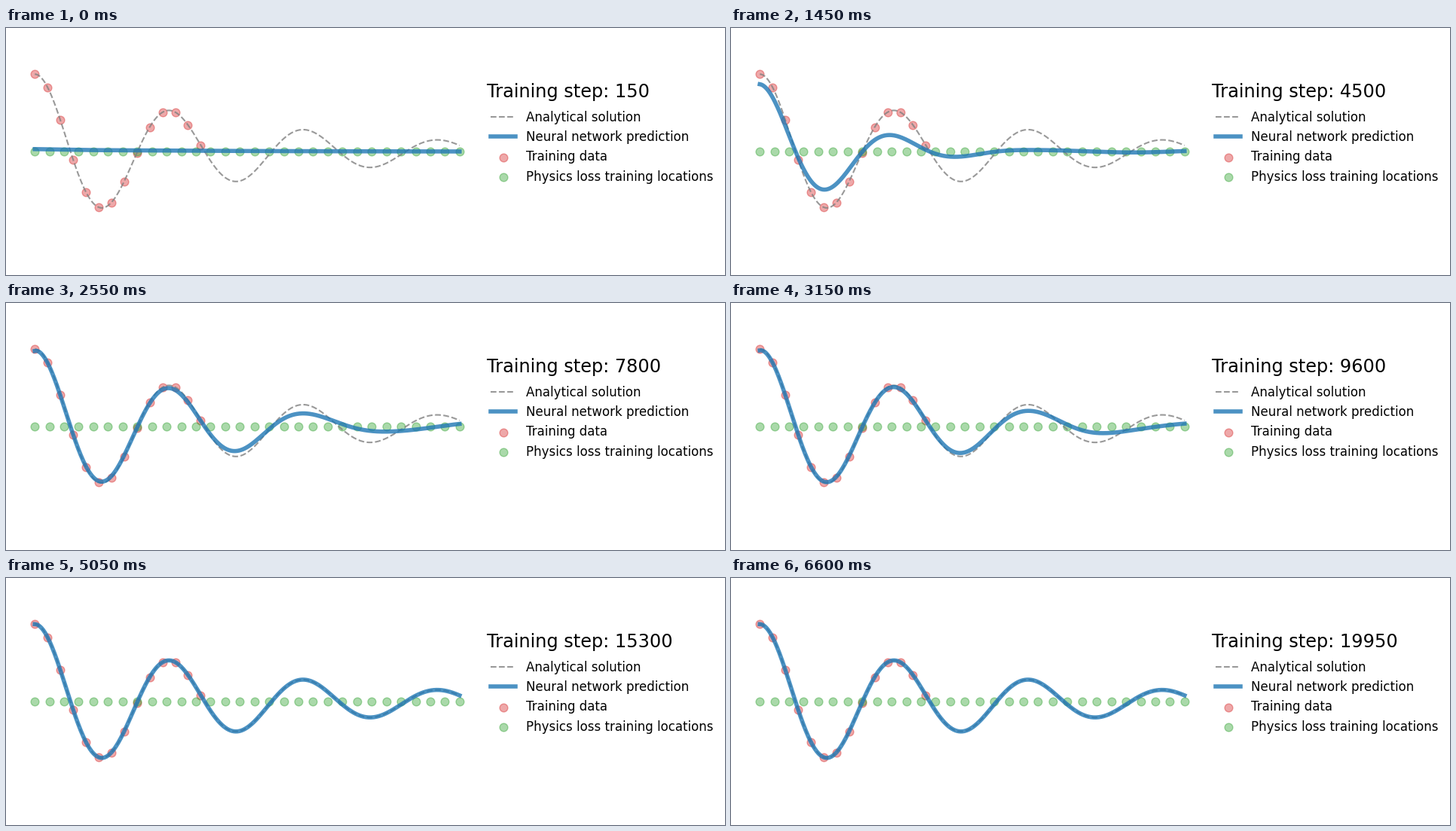
A matplotlib script that plays this animation: 954 by 328 pixels, repeating every 6.65 s.

```python
import numpy as np
import matplotlib.pyplot as plt
from matplotlib.animation import FuncAnimation

W, H, DPI = 954, 328, 100
FRAMES, INTERVAL = 133, 50
STEPS_PER_FRAME = 150
DAMPING, OMEGA0 = 2, 20

plt.rcParams["font.family"] = "DejaVu Sans"

omega = np.sqrt(OMEGA0**2 - DAMPING**2)
phase = np.arctan(-DAMPING / omega)

x = np.linspace(0, 1, 500)
s = x * omega / np.pi  # position in half periods
exact = np.exp(-DAMPING * x) * np.cos(omega * x + phase) / np.cos(phase)


def sigmoid(t):
    return 1 / (1 + np.exp(-t))


def flat_guess(n):
    """Nearly level line before the oscillation is found."""
    start = 0.03 * np.exp(-s / 2.5) - 0.002
    ripple = (0.065 * np.exp(-1.5 * s)
              + 0.015 * np.cos(2 * np.pi * (s - 4.2) / 5.5))
    mix = min(n / 19, 1)
    fade = np.interp(n, [19, 30], [1, 0])
    return fade * ((1 - mix) * start + mix * ripple)


def tail_lag(n):
    """Slow swing past the training data, late against the exact one."""
    size = np.interp(n, [26, 39, 63, 90], [0, 0.055, 0.052, 0])
    return size * sigmoid(4 * (s - 4)) * np.cos(np.pi * (s - 4.5) / 1.1)


def predict(n):
    # The learned region spreads from left to right
    front = np.interp(n, [19, 28, 39, 63, 79, 98], [-5, 1.4, 3.85, 4.75, 5.6, 11])
    learned = sigmoid(1.15 * (front - s))
    hook = np.interp(n, [28, 39, 98], [0, 0.02, 0]) * np.exp(-x / 0.01)
    return learned * exact + flat_guess(n) + tail_lag(n) - hook


fig = plt.figure(figsize=((W + 1e-6) / DPI, (H + 1e-6) / DPI), dpi=DPI,
                 facecolor="white")
ax = fig.add_axes([10 / W, 10 / H, 620 / W, 308 / H])
ax.set_xlim(-0.05, 1.05)
ax.set_ylim(-1.5, 1.5)
ax.axis("off")

ax.plot(x, exact, "--", color="grey", linewidth=1.5, alpha=0.8,
        label="Analytical solution")
curve, = ax.plot(x, predict(0), color="tab:blue", linewidth=4, alpha=0.8,
                 label="Neural network prediction")
ax.scatter(x[:200:15], exact[:200:15], s=60, color="tab:red", alpha=0.4,
           label="Training data")
ax.scatter(np.linspace(0, 1, 30), np.zeros(30), s=60, color="tab:green",
           alpha=0.4, label="Physics loss training locations")
ax.legend(loc=(1.01, 0.34), frameon=False, fontsize="large", labelcolor="k")
title = ax.text(1.065, 0.7, "", fontsize="xx-large", color="k")


def update(n):
    curve.set_ydata(predict(n))
    title.set_text(f"Training step: {STEPS_PER_FRAME * (n + 1)}")
    return curve, title


anim = FuncAnimation(fig, update, frames=FRAMES, interval=INTERVAL,
                     repeat=True, repeat_delay=0)
plt.show()
```
